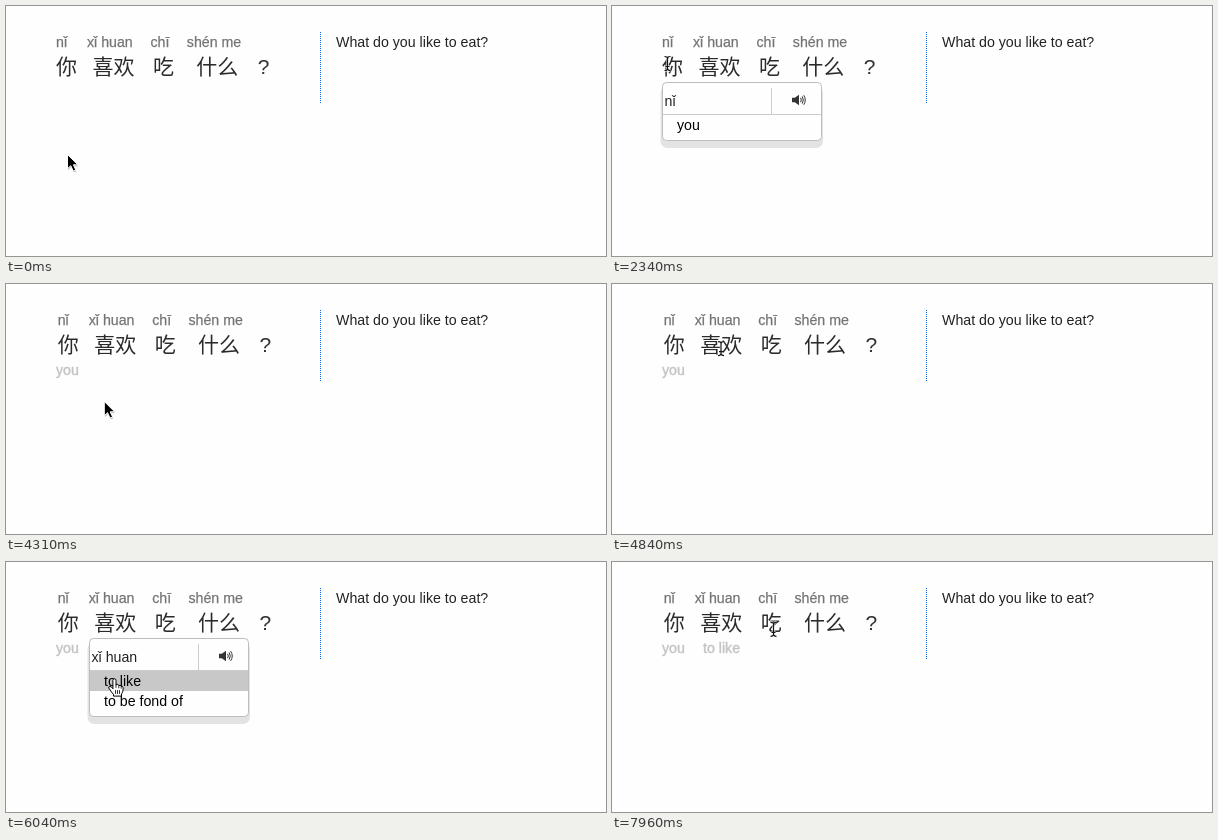
Animation, 600 px wide and 250 px high, one loop 8000 ms. Source, as an HTML page:

```html
<!DOCTYPE html>
<html lang="en">
<head>
<meta charset="utf-8">
<title>Word glosses</title>
<style>
  html, body { margin: 0; width: 100%; height: 100%; overflow: hidden; background: #fefefe; }
  svg { display: block; width: 600px; height: 250px; }
  text { font: 14.2px "Liberation Sans", Arial, sans-serif; fill: #222; white-space: pre; }
  .pinyin { fill: #747474; stroke: #747474; stroke-width: .25; }
  .hanzi { font: 21px "Noto Sans CJK SC", "Noto Sans CJK", sans-serif; fill: #2b2b2b; }
  .mark { font-size: 21px; fill: #333; }
  .gloss { fill: #c4c4c4; stroke: #c4c4c4; stroke-width: .4; }
  .item { fill: #000; }
  .rule { stroke: #ccc; }
</style>
</head>
<body>
<svg viewBox="0 0 600 250">
  <defs>
    <path id="arrowShape" d="M0 0V14.2L3.3 11.2L5.7 16.6L8.3 15.5L5.9 10.3H10.4Z"/>
    <path id="beamShape" d="M-3 -7Q0 -7 0 -5Q0 -7 3 -7M0 -5V5M-3 7Q0 7 0 5Q0 7 3 7M-2 3H2" fill="none"/>
  </defs>
  <g id="words"></g>
  <text x="330" y="41">What do you like to eat?</text>
  <path d="M314.5 26V97" stroke="#0a62e0" stroke-dasharray="1 1"/>
  <g id="glosses"></g>
  <g id="popups"></g>
  <g id="cursor">
    <g id="arrow">
      <use href="#arrowShape" x=".6" y="1.4" opacity=".25"/>
      <use href="#arrowShape" stroke="#fff"/>
    </g>
    <g id="beam">
      <use href="#beamShape" stroke="#fff" stroke-width="2.4" opacity=".8"/>
      <use href="#beamShape" stroke="#111" stroke-width="1.2"/>
    </g>
    <g id="hand" stroke="#000" stroke-linejoin="round" stroke-linecap="round">
      <path d="M-1.6 9.5V1.8Q-1.6 .3 0 .3Q1.5 .3 1.5 1.8V6.2Q3.8 5 4.3 7Q6.3 6 6.7 7.9Q8.6 7.3 8.6 9.3V11.5Q8.3 14 7 15.4V17.6H-1V16Q-3.2 13.6 -4.2 11.6L-5.7 9.6Q-6.3 8 -4.6 7.9Q-3.2 8 -1.6 10Z" fill="#fff"/>
      <path d="M1.5 6.2V9M4.3 7V9.4M6.7 7.9V9.8M1 12V15M3 12V15M5 12V15" fill="none" stroke-width=".8"/>
    </g>
  </g>
</svg>
<script>
const LOOP = 8000, STEP = 60, ROW_TOP = 109, ROW = 20;
const $ = id => document.getElementById(id);

const words = [
  { x: 50, pinyin: "nǐ", hanziX: 50, hanzi: "你" },
  { x: 81, pinyin: "xǐ huan", hanziX: 86.6, hanzi: "喜欢" },
  { x: 144.5, pinyin: "chī", hanziX: 147, hanzi: "吃" },
  { x: 180.8, pinyin: "shén me", hanziX: 190.2, hanzi: "什么" }
];

const popups = [
  { from: 2340, to: 3650, x: 50, title: "nǐ", items: ["you"], glossX: 50 },
  { from: 5140, to: 6580, x: 83, title: "xǐ huan", items: ["to like", "to be fond of"], glossX: 91 }
];

// Each move eases from the last stop to the next, pulled towards a bend
const home = [61.5, 148.5];
const moves = [
  { from: 1380, to: 1980, bend: [72, 100], end: [55.5, 57.5] },
  { from: 2700, to: 3350, bend: [57, 95], end: [65.5, 119.5] },
  { from: 4070, to: 4900, bend: [109, 145], end: [109, 61.5] },
  { from: 5560, to: 6040, bend: [104, 104], end: [108.5, 116.5] },
  { from: 7050, to: 7960, bend: [107, 136], end: [161.5, 67.3] }
];

const label = (x, y, cls, str) => `<text x="${x}" y="${y}" class="${cls}">${str}</text>`;

function popupMarkup({ x, title, items }) {
  const h = 38 + items.length * ROW;
  const rows = items.map((s, i) =>
    `<rect class="row" x="${x + 1}" y="${ROW_TOP + i * ROW}" width="158" height="${ROW}" fill="#c8c8c8"/>` +
    label(x + 15, 124 + i * ROW, "item", s)).join("");
  return `<g>
    <rect x="${x - 1.5}" y="80" width="162.5" height="${h + 4}" rx="7" fill="#e3e3e3"/>
    <rect x="${x + .5}" y="76.5" width="159" height="${h}" rx="4" fill="#fefefe" stroke="#bdbdbd"/>
    ${rows}
    <path class="rule" d="M${x + 1} 108.5H${x + 159}M${x + 109.5} 82V108"/>
    ${label(x + 2.5, 100, "", title)}
    <g transform="translate(${x + 130} 94)">
      <path d="M0 -2.2H2.8L7 -5.2V5.2L2.8 2.2H0Z" fill="#333"/>
      <path d="M8.6 -2.2Q10 0 8.6 2.2M10.2 -3.6Q12.4 0 10.2 3.6M11.7 -4.8Q14.8 0 11.7 4.8" fill="none" stroke="#333"/>
    </g></g>`;
}

$("words").innerHTML = words.map(w =>
  label(w.x, 41, "pinyin", w.pinyin) + label(w.hanziX, 68.4, "hanzi", w.hanzi)).join("") +
  label(251.7, 68, "mark", "?");
$("glosses").innerHTML = popups.map(p => label(p.glossX, 91, "gloss", p.items[0])).join("");
$("popups").innerHTML = popups.map(popupMarkup).join("");

const show = (el, on) => { el.style.display = on ? "" : "none"; };

// The pointer is sampled every STEP ms while it moves
function pointer(t) {
  const i = moves.findLastIndex(m => t >= m.from);
  if (i < 0) return home;
  const { from, to, bend, end } = moves[i];
  const start = i ? moves[i - 1].end : home;
  const ticks = Math.floor((t - from) / STEP) + 1;
  const p = Math.min(1, ticks * STEP / (to - from + STEP));
  const u = Math.sin(p * Math.PI / 2), v = 1 - u;
  return start.map((s, k) => v * v * s + 2 * u * v * bend[k] + u * u * end[k]);
}

function draw(t) {
  const [x, y] = pointer(t);
  const row = Math.floor((y - ROW_TOP) / ROW);

  $("words").setAttribute("transform", `translate(${t >= popups[0].to ? 1.7 : 0} 0)`);
  popups.forEach((p, i) => {
    const box = $("popups").children[i];
    show(box, t >= p.from && t < p.to);
    show($("glosses").children[i], t >= p.to);
    box.querySelectorAll(".row").forEach((r, k) => show(r, k === row));
  });

  const overMenu = row >= 0 && popups.some(p => t >= p.from && t < p.to + STEP);
  const kind = overMenu ? "hand" : y < 73 ? "beam" : "arrow";
  for (const id of ["arrow", "beam", "hand"]) show($(id), id === kind);
  $("cursor").setAttribute("transform", `translate(${x.toFixed(1)} ${y.toFixed(1)})`);
}

const began = performance.now();
function tick() {
  draw((performance.now() - began) % LOOP);
  requestAnimationFrame(tick);
}
tick();
</script>
</body>
</html>
```
